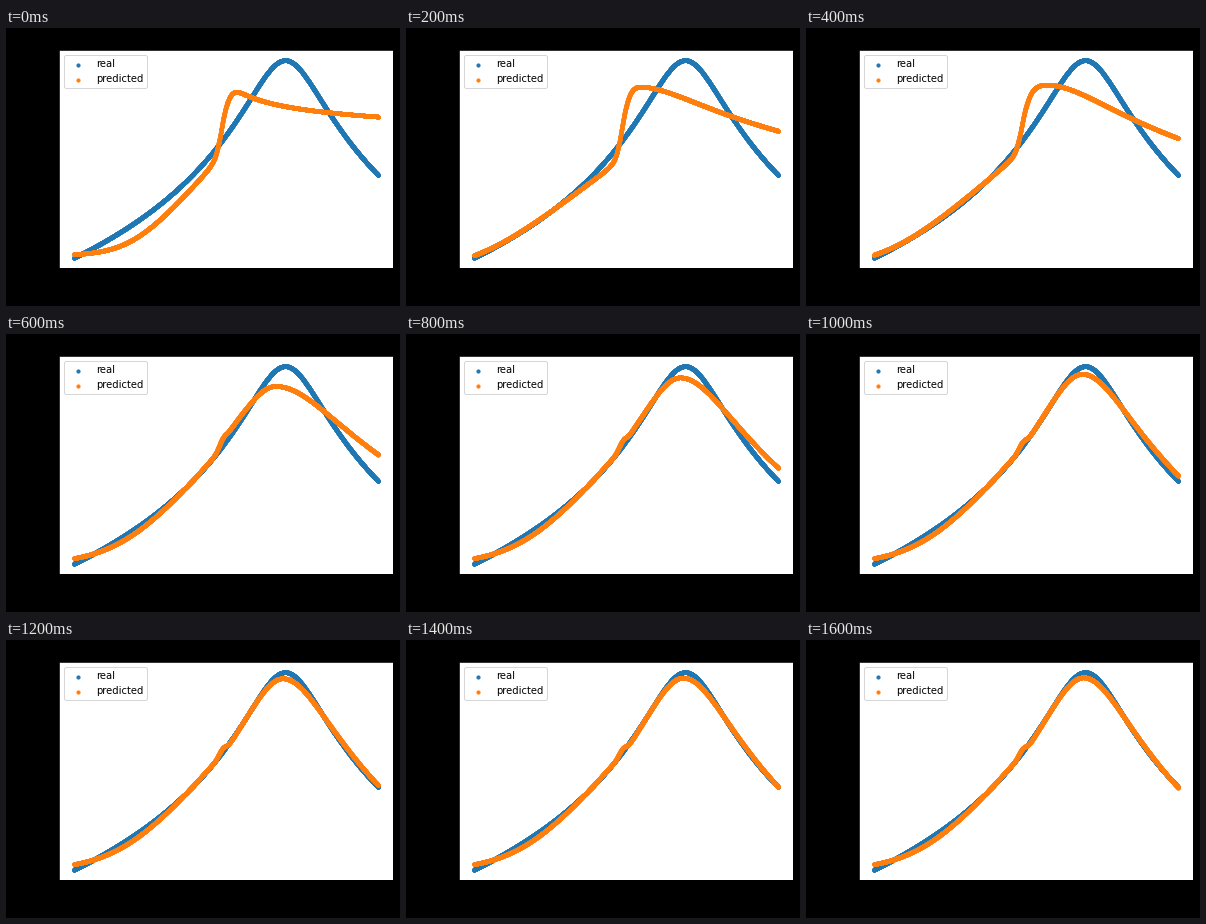
Write a matplotlib script that moves like this. It is 394 px wide and 278 px high and loops after 1800 ms.

```python
import numpy as np
import matplotlib.pyplot as plt
from matplotlib.animation import FuncAnimation

W, H, DPI = 394, 278, 72
LEFT, TOP = 52.65, 22.3
AX_W, AX_H = 334.8, 217.44
STEPS = 9

# Shape of the fit at three moments of training, in pixels:
# rise (base, height, bend, softness), hill (top, height, centre, width).
FIRST = np.array([227.4, 22.5, 126.3, 20, 62, 5.3, 225.3, 12])
SECOND = np.array([242.6, 23, 69.3, 30, 58.2, 23.5, 229.3, 60])
THIRD = np.array([230.2, 35.5, 118.4, 30, 52, 50, 269.3, 60])
FINAL = np.array([230.2, 35.5, 118.4, 30, 37.2, 62.7, 277.3, 43])

margin = AX_W / 22
x = np.linspace(LEFT + margin, LEFT + AX_W - margin, 3000)


def hill(top, height, centre, width):
    """Rounded peak with logarithmic flanks."""
    return top + height * np.log1p(((x - centre) / width) ** 2)


def shape_at(step):
    if step == 0:
        return FIRST
    if step <= 3:
        return SECOND + (THIRD - SECOND) * ((step - 1) / 2) ** 2
    return FINAL + (THIRD - FINAL) * 0.42 ** (step - 3)


def predicted_curve(step):
    base, rise, bend, soft, top, height, centre, width = shape_at(step)
    left = base - rise * np.log1p(np.exp((x - bend) / soft))
    right = hill(top, height, centre, np.where(x < centre, 39, width))
    switch = 1 / (1 + np.exp((217.6 - x) / 3.3))
    bump = 5 * np.exp(-((x - 216.3) / 5) ** 2)
    return left + (right - left) * switch - bump


# The tiny surplus keeps the pixel size from being truncated.
fig = plt.figure(figsize=((W + 1e-6) / DPI, (H + 1e-6) / DPI), dpi=DPI,
                 facecolor="black")
ax = fig.add_axes([LEFT / W, 1 - (TOP + AX_H) / H, AX_W / W, AX_H / H])
ax.set(xlim=(LEFT, LEFT + AX_W), ylim=(TOP + AX_H, TOP), xticks=[], yticks=[])

ax.scatter(x, hill(32.2, 53.7, 279.1, 34), s=10, color="tab:blue",
           label="real")
fit = ax.scatter(x, predicted_curve(0), s=10, color="tab:orange",
                 label="predicted")
ax.legend(loc="upper left", prop={"family": "DejaVu Sans", "size": 10})


def update(step):
    fit.set_offsets(np.column_stack([x, predicted_curve(step)]))
    return [fit]


anim = FuncAnimation(fig, update, frames=STEPS, interval=200,
                     repeat=True, repeat_delay=0)
plt.show()
```
